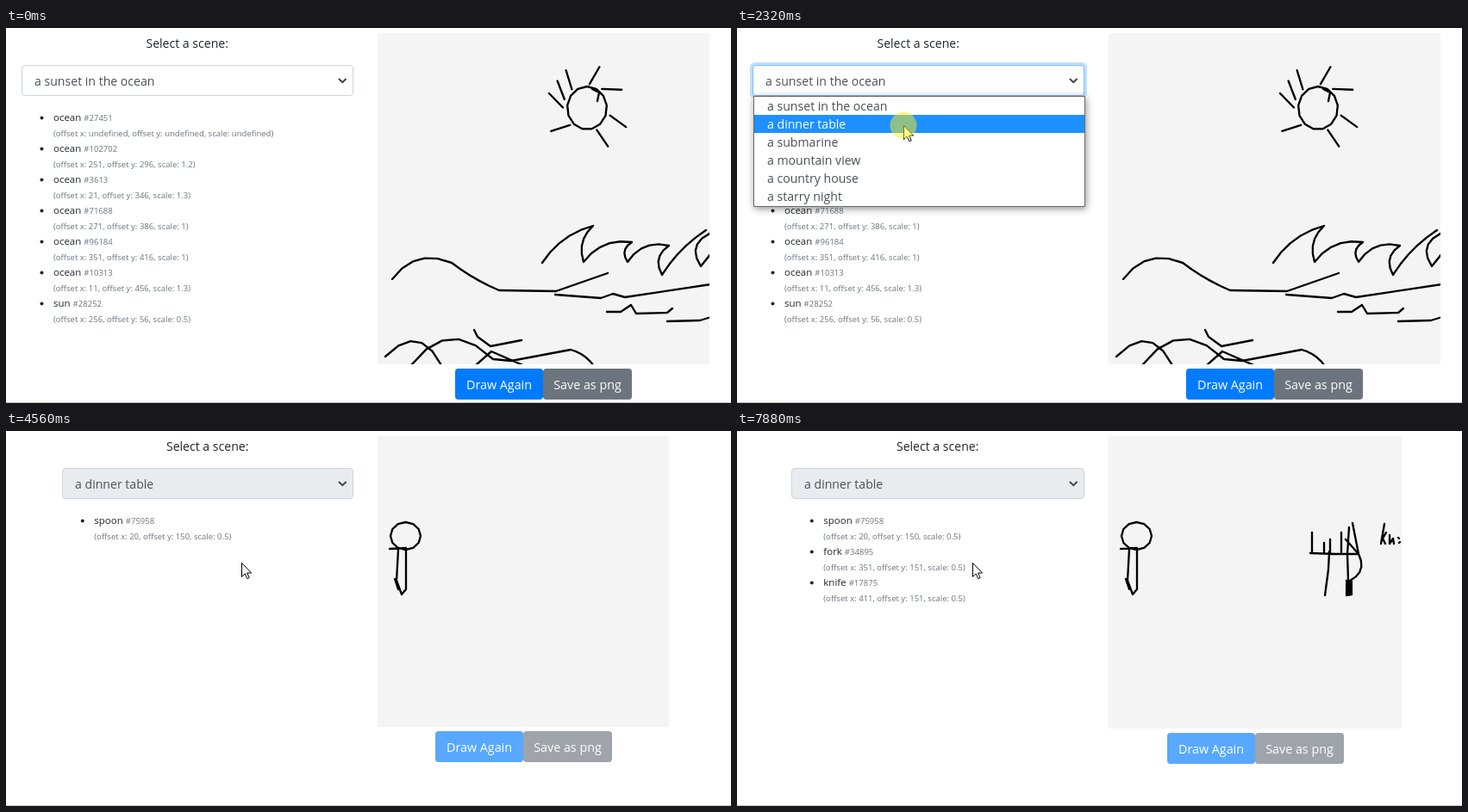
Write an HTML page that moves like this. It is 841x436 px and loops after 8 s.

```html
<!DOCTYPE html>
<html lang="en">
<head>
<meta charset="utf-8">
<title>Scene sketcher</title>
<style>
html, body { margin: 0; width: 100%; height: 100%; overflow: hidden; background: #fff; }
svg { display: block; width: 841px; height: 436px; }
text { font: 14.1px "Open Sans", "Noto Sans", sans-serif; fill: #212529; white-space: pre; }
.field { fill: #495057; }
.button { font-size: 14.3px; fill: #fff; text-anchor: middle; }
.title { text-anchor: middle; }
.name { font-size: 11.5px; }
.note { font-size: 9.55px; fill: #6c757d; }
.ink { fill: none; stroke: #000; stroke-width: 2.35; stroke-linecap: round; stroke-linejoin: round; }
</style>
</head>
<body>
<svg id="stage" viewBox="0 0 841 436"></svg>
<script>
const LOOP = 8000;
const stage = document.getElementById('stage');

function add(parent, tag, attrs = {}, text) {
  const el = document.createElementNS('http://www.w3.org/2000/svg', tag);
  set(el, attrs);
  if (text !== undefined) el.textContent = text;
  parent.appendChild(el);
  return el;
}
function set(el, attrs) {
  for (const key in attrs) el.setAttribute(key, attrs[key]);
}
const show = (el, on) => el.setAttribute('visibility', on ? 'visible' : 'hidden');
const range = (n, f) => Array.from({ length: n }, (_, i) => f(i));
const polar = (x, y, r, deg) =>
  [x + r * Math.cos(deg * Math.PI / 180), y + r * Math.sin(deg * Math.PI / 180)];

// Stroke through key points; a third value bows the way there to its left.
function chain(start, ...rest) {
  const pts = [start];
  let [x, y] = start;
  for (const [nx, ny, bow = 0] of rest) {
    const n = bow ? 5 : 1, dx = nx - x, dy = ny - y, len = Math.hypot(dx, dy);
    for (let i = 1; i <= n; i++) {
      const s = i / n, h = 4 * s * (1 - s) * bow / len;
      pts.push([x + dx * s + dy * h, y + dy * s - dx * h]);
    }
    [x, y] = [nx, ny];
  }
  return pts;
}

// Closed stroke of n straight sides.
const ring = (x, y, rx, ry, n) => range(n + 1, i => {
  const [c, s] = polar(0, 0, 1, 360 * i / n - 90);
  return [x + rx * c, y + ry * s];
});

// Sun ray from a place around the disc, with its own heading.
function ray([place, heading]) {
  const from = polar(674, 93, 28, place);
  return [from, polar(...from, 23, heading)];
}

const sunset = [
  ring(674, 93, 23, 25, 13),
  ...[[-84, -60], [-52, 2], [18, 36], [66, 56], [135, 162], [181, 226], [201, 249], [231, 253]].map(ray),
  chain([680, 71], [688, 75], [686, 85]),
  chain([622, 273], [681, 230, 7], [670, 272, -7], [726, 249, 9], [721, 272, -6],
    [769, 253, 9], [761, 287, -8], [812, 235, 4]),
  chain([816, 239], [806, 277, -11], [818, 262]),
  chain([448, 292], [517, 273, 14], [572, 305, -2], [638, 306], [698, 285]),
  chain([637, 310], [690, 314], [704, 309], [718, 313], [818, 298]),
  chain([697, 330], [713, 330], [725, 322], [731, 332], [767, 331], [773, 326]),
  chain([767, 341], [805, 340], [818, 336]),
  chain([440, 382], [505, 392, 23]),
  chain([470, 392], [565, 385, 27], [586, 387], [655, 374], [682, 393, 3]),
  chain([543, 351], [547, 359], [562, 370], [598, 363]),
  chain([545, 392], [563, 376], [604, 394])
];
const spoon = [
  ring(463.5, 122, 17.5, 16, 12),
  chain([445, 137], [464, 136]),
  chain([455, 138], [453, 174], [459, 190], [464, 184], [464, 138]),
  chain([451, 172], [455, 184])
];
const fork = [
  chain([687, 140], [686, 161], [682, 191]),
  chain([665, 142], [694, 143], [721, 143]),
  ...[[667, 118], [681, 130], [688, 126], [701, 118]].map(([x, y]) => chain([x, y], [x, 141]))
];
const knife = [
  chain([710, 112], [708, 143], [709, 174]),
  chain([714, 107], [721, 143], [711, 174, 8]),
  chain([706, 126], [721, 143]),
  range(19, i => [i % 2 ? 713 : 707, 174 + i * 0.95]),
  chain([751, 108], [747, 131]),
  chain([753, 118], [749, 125], [752, 131]),
  chain([757, 121], [757, 131], [761, 125], [762, 131]),
  chain([767, 124], [768, 125]),
  chain([768, 130], [769, 129])
];

// Path of the first part of a sketch, counted in segments.
function trace(strokes, part = 1) {
  let left = Math.round(part * strokes.reduce((n, pts) => n + pts.length - 1, 0));
  let d = '';
  for (const pts of strokes) {
    if (left <= 0) break;
    d += 'M' + pts.slice(0, left + 1).join('L');
    left -= pts.length - 1;
  }
  return d;
}

const SCENES = ['a sunset in the ocean', 'a dinner table', 'a submarine',
  'a mountain view', 'a country house', 'a starry night'];
const note = (x, y, s) => `(offset x: ${x}, offset y: ${y}, scale: ${s})`;

// Page
add(stage, 'rect', { width: 841, height: 436, fill: '#fff' });
add(stage, 'rect', { y: 435, width: 841, height: 1, fill: '#c8c8c8' });
const title = add(stage, 'text', { class: 'title', y: 23 }, 'Select a scene:');
const glow = add(stage, 'rect', { y: 40, height: 42, rx: 6, fill: '#007bff' });
const select = add(stage, 'rect', { y: 43.5, height: 35, rx: 3.5 });
const choice = add(stage, 'text', { class: 'field', y: 66.5 });
add(stage, 'path', { d: 'M386 59L390.3 63.2L394.6 59', fill: 'none', stroke: '#454545', 'stroke-width': 2 });

function makeList(rows) {
  const list = add(stage, 'g');
  const items = rows.map(([name, id, ...args], i) => {
    const g = add(list, 'g', { transform: `translate(0 ${36 * i})` });
    add(g, 'circle', { cx: 23.5, cy: 104.5, r: 2, fill: '#212529' });
    const line = add(g, 'text', { class: 'name', x: 37, y: 108 }, name + ' ');
    add(line, 'tspan', { class: 'note' }, '#' + id);
    add(g, 'text', { class: 'note', x: 37, y: 126 }, note(...args));
    return g;
  });
  return { list, items };
}
const oceanList = makeList([
  ['ocean', 27451],
  ['ocean', 102702, 251, 296, 1.2],
  ['ocean', 3613, 21, 346, 1.3],
  ['ocean', 71688, 271, 386, 1],
  ['ocean', 96184, 351, 416, 1],
  ['ocean', 10313, 11, 456, 1.3],
  ['sun', 28252, 256, 56, 0.5]
]);
const tableList = makeList([
  ['spoon', 75958, 20, 150, 0.5],
  ['fork', 34895, 351, 151, 0.5],
  ['knife', 17875, 411, 151, 0.5]
]);

const paper = add(stage, 'rect', { x: 431, y: 6, fill: '#f4f4f4' });
const clip = add(add(stage, 'defs'), 'clipPath', { id: 'paper' });
const clipBox = add(clip, 'rect', { x: 431, y: 6 });
const ink = add(add(stage, 'g', { 'clip-path': 'url(#paper)' }), 'path', { class: 'ink' });

const buttons = add(stage, 'g');
[['Draw Again', 0, 102, '#007bff'], ['Save as png', 102, 103, '#6c757d']].forEach(([label, x, w, fill]) => {
  add(buttons, 'rect', { x, width: w, height: 36, rx: 3.7, fill });
  add(buttons, 'text', { class: 'button', x: x + w / 2, y: 23.5 }, label);
});

const popup = add(stage, 'g');
add(popup, 'rect', { x: 19.5, y: 79.5, width: 384, height: 128, fill: '#fff', stroke: '#6b6b6b',
  style: 'filter: drop-shadow(1px 2px 4.5px rgba(0,0,0,.45))' });
const hover = add(popup, 'rect', { x: 20, width: 383, height: 21, fill: '#1e90ff' });
const options = SCENES.map((s, i) => add(popup, 'text', { class: 'field', x: 35, y: 96 + 21 * i }, s));

const cursor = add(stage, 'path', { d: 'M.5 .5V16.5L4.2 13L6.8 18.7L9.2 17.6L6.7 12H11.6Z', fill: '#fff', stroke: '#000' });
const halo = add(stage, 'circle', { r: 15.5, fill: '#fff018' });

// Number of completed steps of n between two times, both ends included.
const steps = (t, from, to, n) =>
  t < from ? 0 : Math.min(n, Math.floor((t - from) / ((to - from) / (n - 1)) + 0.001) + 1);
const drawn = (t, from, to, n) => Math.min(1, steps(t, from, to, n) / (n - 1));
const ease = p => p * p * (3 - 2 * p);
const mix = (a, b, p) => a.map((v, i) => v + (b[i] - v) * p);

function pointer(t) {
  const start = [383, 260], field = [216, 57], option = [193, 113], rest = [273, 153];
  if (t < 1540) return mix(start, field, ease(Math.max(0, steps(t, 140, 600, 7) - 1) / 6));
  if (t < 3410) return mix(field, option, ease(steps(t, 1540, 1920, 6) / 6));
  return mix(option, rest, ease(steps(t, 3410, 3790, 6) / 6));
}

function render(t) {
  const table = t >= 2470;
  const done = [4560, 6190, 7880].filter(end => t >= end).length;
  const size = !table ? 385 : [333, 338, 340, 340][done];
  const left = 403 - size;
  const focus = t < 1140 || t >= 2550 ? 0 : t < 1220 ? 0.5 : 1;

  set(title, { x: left + size / 2 - 0.3 });
  set(glow, { x: left - 3, width: size + 6, 'fill-opacity': 0.25 * focus });
  set(select, {
    x: left + 0.5, width: size - 1, fill: table ? '#e9ecef' : '#fff',
    stroke: focus ? '#80bdff' : t >= 1070 && t < 1140 ? '#b0cdec' : '#ced4da'
  });
  set(choice, { x: left + 15 });
  choice.textContent = SCENES[table ? 1 : 0];

  show(oceanList.list, !table);
  set(oceanList.list, { transform: `translate(${left} 0)` });
  set(tableList.list, { transform: `translate(${left + 0.3} 0)` });
  tableList.items.forEach((g, i) => show(g, i < done));

  set(paper, { width: size, height: size });
  set(clipBox, { width: size, height: size });
  set(buttons, {
    transform: `translate(${Math.round(431 + size / 2 - 102.5)} ${11 + size})`,
    opacity: table ? 0.65 : 1
  });
  set(ink, {
    d: !table ? trace(sunset) :
      trace(spoon, drawn(t, 4020, 4560, 8)) +
      trace(fork, drawn(t, 5890, 6190, 5)) +
      trace(knife, drawn(t, 6880, 7880, 14))
  });

  const [x, y] = pointer(t).map(Math.round);
  const row = y > 101 ? 1 : 0;
  show(popup, t >= 1070 && !table);
  set(hover, { y: 80 + 21 * row });
  options.forEach((o, i) => { o.style.fill = i === row ? '#fff' : ''; });

  show(cursor, t >= 140);
  set(cursor, { transform: `translate(${x} ${y})` });
  show(halo, (t >= 980 && t < 1140) || (t >= 2320 && t < 2470));
  set(halo, { cx: x, cy: y, 'fill-opacity': t < 1140 ? 0.7 : 0.5 });
}

const begin = performance.now();
function tick() {
  render((performance.now() - begin) % LOOP);
  requestAnimationFrame(tick);
}
render(0);
requestAnimationFrame(tick);
</script>
</body>
</html>
```
